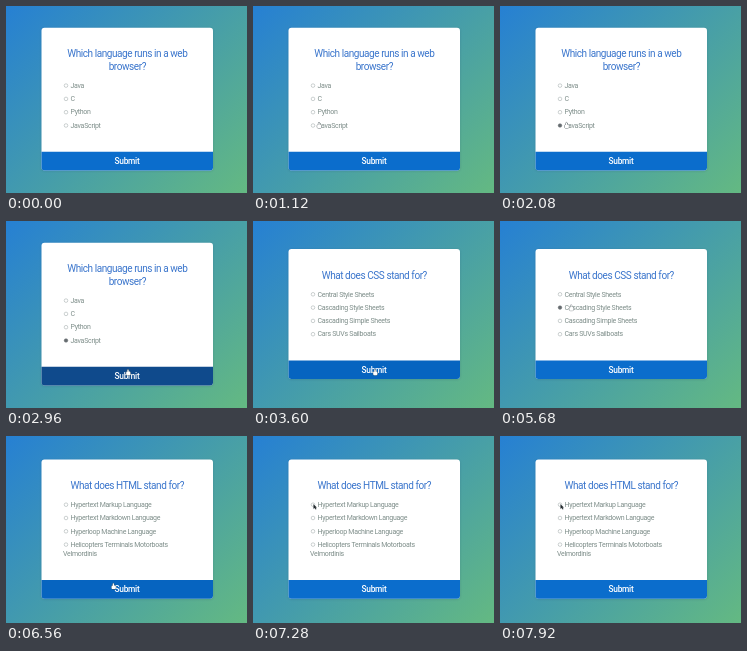
An HTML page with a canvas for the animation above (8 s loop, 241 by 187 pixels).

```html
<!DOCTYPE html>
<html lang="en">
<head>
<meta charset="utf-8">
<title>Quiz</title>
<style>
html, body { margin: 0; width: 100%; height: 100%; overflow: hidden; background: #3f97b5; }
canvas { display: block; width: 241px; height: 187px; }
</style>
</head>
<body>
<canvas id="stage"></canvas>
<script>
const W = 241, H = 187, LOOP = 8000;
const MOVE = 760, PAUSE = 920;
const CARD_X = 35.5, CARD_W = 171.5, BAR = 18.7;
const TITLE_STEP = 12.6, OPTION_STEP = 13.3, WRAP_STEP = 9.2;
const MUTED = '#7d8d89';

const canvas = document.getElementById('stage');
const ctx = canvas.getContext('2d');
const dpr = window.devicePixelRatio || 1;
canvas.width = Math.round(W * dpr);
canvas.height = Math.round(H * dpr);

// start: question appears, go: pointer sets off for the answer
const quiz = [
  { start: 0, go: 360, aim: 66, answer: 3,
    title: ['Which language runs in a web', 'browser?'],
    options: ['Java', 'C', 'Python', 'JavaScript'] },
  { start: 3280, go: 3800, aim: 60.5, answer: 1,
    title: ['What does CSS stand for?'],
    options: ['Central Style Sheets', 'Cascading Style Sheets', 'Cascading Simple Sheets', 'Cars SUVs Sailboats'] },
  { start: 6320, go: 6320, aim: 60.5, answer: 0,
    title: ['What does HTML stand for?'],
    options: ['Hypertext Markup Language', 'Hypertext Markdown Language', 'Hyperloop Machine Language',
      'Helicopters Terminals Motorboats'],
    tail: 'Velmordinis' }
];

// Each card is centred and as tall as its text
for (const q of quiz) {
  const extra = (q.title.length - 1) * TITLE_STEP;
  q.height = 130 + extra + (q.tail ? WRAP_STEP : 0);
  q.top = 93.1 - q.height / 2;
  q.barTop = q.top + q.height - BAR;
  q.first = q.top + 47.4 + extra;
  q.target = { x: q.aim, y: q.first + q.answer * OPTION_STEP - 2.7 };
  q.picked = q.go + MOVE + PAUSE;
  q.pressed = q.picked + MOVE + 80;
}

const submit = { x: 122, y: 151 };
const entry = { x: 150, y: 194 };

function glide(a, b, time) {
  const p = Math.min(1, Math.max(0, time / MOVE));
  const k = p * p * (3 - 2 * p);
  return { x: a.x + (b.x - a.x) * k, y: a.y + (b.y - a.y) * k ** 3 };
}

function pointerAt(q, t) {
  if (q.start === 0 && t < q.go) return null;
  if (t >= q.picked) return glide(q.target, submit, t - q.picked);
  return glide(q.start === 0 ? entry : submit, q.target, t - q.go);
}

function text(str, x, y, size, color, spacing, align = 'left', weight = 400) {
  ctx.font = `${weight} ${size}px Roboto, "Liberation Sans", sans-serif`;
  ctx.letterSpacing = spacing + 'px';
  ctx.textAlign = align;
  ctx.fillStyle = color;
  ctx.fillText(str, x, y);
}

function option(str, x, y) {
  text(str, x, y, 7, MUTED, -0.28);
}

function backdrop() {
  const cx = W / 2, cy = H / 2, r = (W + H) / 4;
  const g = ctx.createLinearGradient(cx - r, cy - r, cx + r, cy + r);
  g.addColorStop(0, '#2680d3');
  g.addColorStop(1, '#64b982');
  ctx.fillStyle = g;
  ctx.fillRect(0, 0, W, H);
}

function panel(y, h, radii, fill) {
  ctx.beginPath();
  ctx.roundRect(CARD_X, y, CARD_W, h, radii);
  ctx.fillStyle = fill;
  ctx.fill();
}

function radio(x, y, on) {
  ctx.beginPath();
  ctx.arc(x, y, 1.8, 0, Math.PI * 2);
  ctx.fillStyle = on ? '#666c70' : '#fff';
  ctx.fill();
  ctx.lineWidth = 0.5;
  ctx.strokeStyle = on ? '#666c70' : '#98a3a3';
  ctx.stroke();
}

function paint(shape, fill, line) {
  ctx.lineWidth = 0.8;
  ctx.strokeStyle = line;
  ctx.stroke(shape);
  ctx.fillStyle = fill;
  ctx.fill(shape);
}

function arrow(x, y) {
  paint(new Path2D(`M${x} ${y}v4.6l1.2-.9 1 1.6.7-.4-.8-1.5 1.2-.2z`), '#22282c', '#d8dddf');
}

function hand(x, y) {
  const shape = new Path2D();
  shape.roundRect(x - 0.6, y - 2.6, 1.2, 4, 0.6);
  shape.roundRect(x - 1.8, y - 0.4, 4.2, 3.6, 1.2);
  paint(shape, '#fff', '#4a5558');
}

function draw(t) {
  ctx.setTransform(dpr, 0, 0, dpr, 0, 0);
  backdrop();

  const q = quiz.findLast(c => t >= c.start);
  const pointer = pointerAt(q, t);
  const hover = pointer && pointer.y > q.barTop && pointer.y < q.barTop + BAR;

  ctx.save();
  ctx.shadowColor = 'rgba(30, 60, 90, 0.22)';
  ctx.shadowBlur = 3 * dpr;
  ctx.shadowOffsetY = 0.5 * dpr;
  panel(q.top, q.height, 3, '#fff');
  ctx.restore();
  const barColor = t >= q.pressed ? '#0f4a8c' : hover ? '#0664c0' : '#0b6dcc';
  panel(q.barTop, BAR, [0, 0, 3, 3], barColor);

  q.title.forEach((line, i) =>
    text(line, 121.3, q.top + 29.6 + i * TITLE_STEP, 10, '#3a75cc', -0.43, 'center'));

  q.options.forEach((label, i) => {
    const y = q.first + i * OPTION_STEP;
    radio(60, y - 2.2, i === q.answer && t >= q.picked);
    option(label, 64.5, y);
  });
  if (q.tail) option(q.tail, 57, q.first + 3 * OPTION_STEP + WRAP_STEP - 0.4);

  text('Submit', 121, q.barTop + 12.3, 8.4, '#fff', -0.3, 'center', 500);

  if (pointer) {
    const overLabel = pointer.x > 63.5 && pointer.y < q.barTop;
    (hover || overLabel ? hand : arrow)(pointer.x, pointer.y);
  }
}

const began = performance.now();
function tick() {
  draw((performance.now() - began) % LOOP);
  requestAnimationFrame(tick);
}
tick();
</script>
</body>
</html>
```
